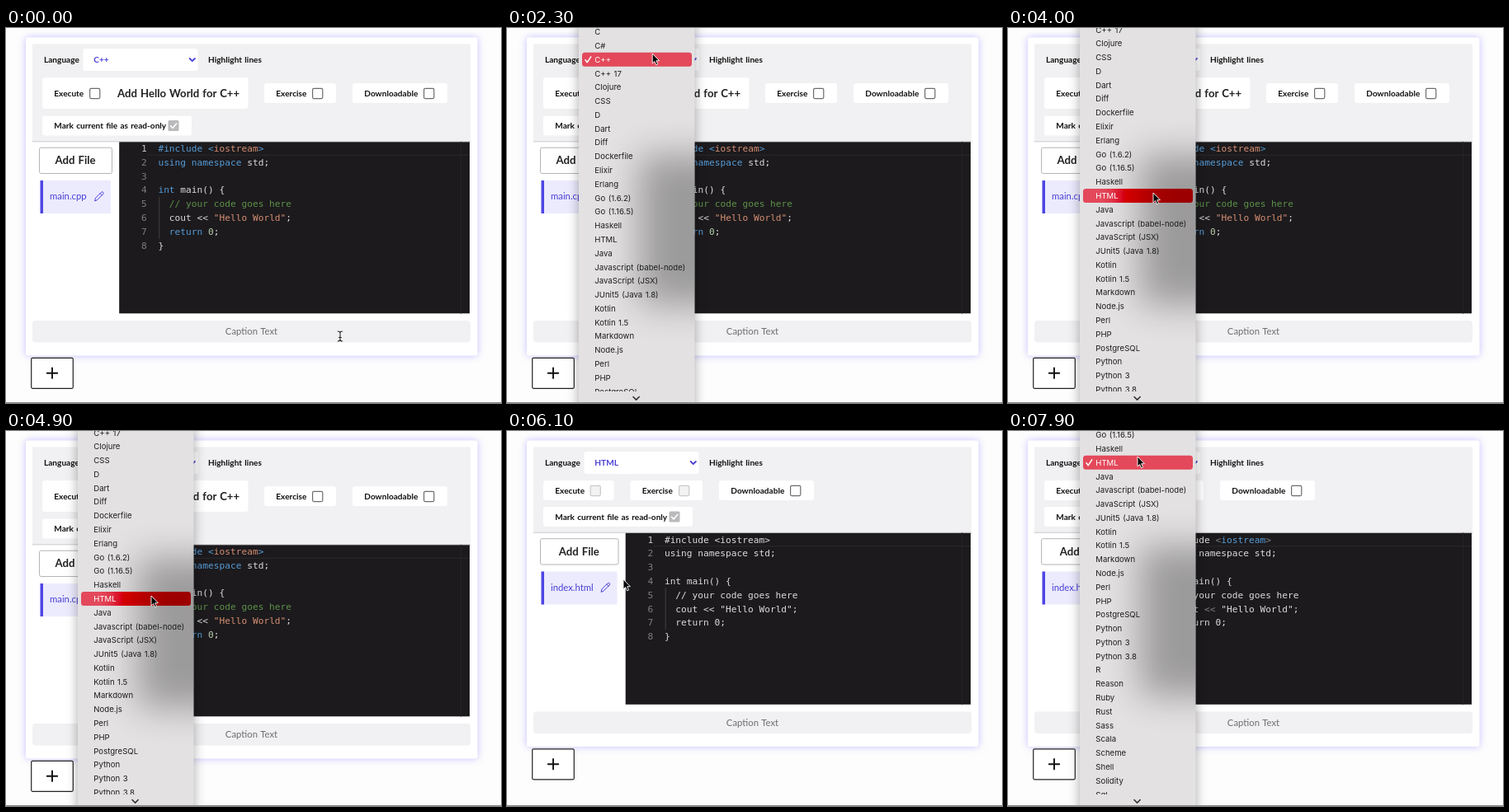
Animation, 600 px wide and 455 px high, one loop 8000 ms. Source, as an HTML page:

```html
<!DOCTYPE html>
<html lang="en">
<head>
<meta charset="utf-8">
<title>Choosing a language</title>
<style>
  html, body { margin: 0; width: 100%; height: 100%; overflow: hidden; background: #fdfdfd; }
  svg { display: block; }
  text { white-space: pre; }
  .ui { font: 400 11.3px Lato, sans-serif; word-spacing: .8px; }
  .label { font: 700 10.1px Lato, sans-serif; fill: #111; }
  .title { font: 700 13.2px Lato, sans-serif; fill: #222; }
  .accent { fill: #4a3fd6; }
  .code { font: 11.2px "DejaVu Sans Mono", monospace; word-spacing: 0; fill: #dcdcdc; }
  .num { fill: #7d7d7f; text-anchor: end; }
  .cpp .k, .cpp .a, .html .h { fill: #569cd6; }
  .cpp .h, .cpp .s { fill: #d58f72; }
  .cpp .c { fill: #5d9149; }
  .cpp .n { fill: #b5cea8; }
  .html .a, .html .o { fill: #808080; }
  .card { filter: drop-shadow(0 0 5px #a9a4ffb0); }
  #panel { filter: drop-shadow(0 3px 7px #0005); }
  #shade { filter: blur(22px); }
  #bar { mix-blend-mode: color-burn; }
  .item { font: 9.6px Inter, sans-serif; fill: #1e1e1e; }
  .item.on { fill: #fff; }
  .line { fill: none; stroke-linecap: round; stroke-linejoin: round; }
</style>
</head>
<body>
<svg id="stage" width="600" height="455" viewBox="0 0 600 455"></svg>
<script>
const rect = (x, y, w, h, fill, more = '') =>
  `<rect x="${x}" y="${y}" width="${w}" height="${h}" fill="${fill}" ${more}/>`;
const text = (x, y, s, cls, more = '') =>
  `<text x="${x}" y="${y}" class="${cls}" xml:space="preserve" ${more}>${s}</text>`;
const line = (d, color, w) =>
  `<path class="line" d="${d}" stroke="${color}" stroke-width="${w}"/>`;

// Each token is [class, text]
const source = [
  [['k', '#include '], ['a', '&lt;'], ['h', 'iostream'], ['a', '&gt;']],
  [['k', 'using namespace'], ['', ' std;']],
  [],
  [['k', 'int'], ['', ' main() {']],
  [['c', '  // your code goes here']],
  [['', '  cout '], ['o', '&lt;&lt;'], ['', ' '], ['s', '"Hello World"'], ['', ';']],
  [['k', '  return '], ['n', '0'], ['', ';']],
  [['', '}']]
];

const items = ['C', 'C#', 'C++', 'C++ 17', 'Clojure', 'CSS', 'D', 'Dart', 'Diff', 'Dockerfile',
  'Elixir', 'Erlang', 'Go (1.6.2)', 'Go (1.16.5)', 'Haskell', 'HTML', 'Java',
  'Javascript (babel-node)', 'JavaScript (JSX)', 'JUnit5 (Java 1.8)', 'Kotlin', 'Kotlin 1.5',
  'Markdown', 'Node.js', 'Perl', 'PHP', 'PostgreSQL', 'Python', 'Python 3', 'Python 3.8', 'R',
  'Reason', 'Ruby', 'Rust', 'Sass', 'Scala', 'Scheme', 'Shell', 'Solidity', 'Sql'];
const ROW = 16.78, FIRST = 38.3 - 2 * ROW;
const CPP = items.indexOf('C++'), HTML = items.indexOf('HTML');

function checkbox(x, y, off) {
  return rect(x + .6, y + .6, 12.2, 12.2, off ? '#f3f2f3' : '#fff',
    `rx="1.5" stroke="${off ? '#c9c8ca' : '#6c6c6e'}" stroke-width="1.2"`);
}

function option(x, y, w, label, off) {
  return rect(x, y, w, 24, '#fff', 'rx="3"') + text(x + 14.3, y + 15.8, label, 'label') +
    checkbox(x + w - 29, y + 5.8, off);
}

function editor(x, y) {
  let s = rect(x, y, 562 - x, 208, '#1c1a1d') +
    line(`M${x + 34} ${y + 16}H561.5`, '#2b292c', 1) +
    line(`M551.5 ${y}V${y + 208}`, '#252326', 1) +
    line(`M${x + 48.5} ${y + 67}v50`, '#404040', 1);
  source.forEach((tokens, i) => {
    const base = y + 11.7 + i * 16.8;
    s += text(x + 33.5, base, i + 1, 'code num', i ? '' : 'style="fill:#c6c6c6"') +
      text(x + 47.2, base, tokens.map(([c, v]) => `<tspan class="${c}">${v}</tspan>`).join(''), 'code');
  });
  return s;
}

function page(isHtml) {
  const up = isHtml ? 14.5 : 0, wide = isHtml ? 6.5 : 0;
  const top = 138.3 - up, cx = 84 + wide / 2, pen = 113 + wide;
  return rect(24, 11.5, 547.5, 386 - up, '#fff', 'rx="3" class="card"') +
    rect(32, 19.5, 531, top - 19.5, '#f1f0f2') +
    line(`M32 ${top - .5}H563`, '#cfcdd0', 1) +
    text(46, 42, 'Language', 'label') +
    rect(93.5, 25, 139, 27, '#fff', 'rx="3"') +
    text(106.3, 42, isHtml ? 'HTML' : 'C++', 'label', 'style="fill:#4a3fd6"') +
    line('M222.7 37l3.1 3.1 3.1-3.1', '#4a3fd6', 1.8) +
    text(245, 42, 'Highlight lines', 'label') +
    (isHtml
      ? option(44, 60, 85.5, 'Execute', true) + option(149.5, 60, 87.5, 'Exercise', true) +
        option(257, 60, 115, 'Downloadable')
      : rect(44, 60, 249.5, 38, '#fff', 'rx="3"') + option(44, 67, 86, 'Execute') +
        text(135, 84, 'Add Hello World for C++', 'title') +
        option(313, 67, 87, 'Exercise') + option(420, 67, 115, 'Downloadable')) +
    rect(44, 106.5 - up, 181, 24, '#fff', 'rx="3"') +
    text(58.3, 122.3 - up, 'Mark current file as read-only', 'label') +
    rect(196.5, 112 - up, 13, 13, '#bab9bc', 'rx="1.5"') +
    line(`M199.5 ${118.8 - up}l2.5 2.6 4.6-5.4`, '#fff', 1.6) +
    rect(40.5, 145.2 - up, 88 + wide, 31.3, '#fff', 'rx="2" stroke="#b5b4b7"') +
    text(cx, 165.3 - up, 'Add File', 'title', 'text-anchor="middle"') +
    rect(41.5, 185 - up, 85.5 + wide, 40, '#ecebfe') +
    rect(41.5, 185 - up, 3.5, 40, '#4f46e5') +
    text(53, 208.3 - up, isHtml ? 'index.html' : 'main.cpp', 'accent') +
    line(`M${pen - 5.3} ${209.5 - up}l.8-3.2 7.2-7.2q1-.8 2 .2t.2 2l-7.2 7.2zM${pen + 1.2} ${200.6 - up}l2.2 2.2`, '#4a3fd6', 1) +
    editor(137.2 + wide, top) +
    rect(32, 355 - up, 531, 26.5, '#f1f0f2', 'rx="4"') +
    text(297.5, 372 - up, 'Caption Text', '', 'text-anchor="middle" fill="#6e6e70"') +
    rect(30.7, 400.3 - up, 50.6, 37, '#fff', 'rx="1.5" stroke="#222" stroke-width="1.2"') +
    line(`M49.8 ${418.7 - up}h12.4m-6.2-6.2v12.4`, '#111', 1.9);
}

const stage = document.getElementById('stage');
stage.innerHTML = `
  <defs><clipPath id="inside">${rect(87, -20, 140.5, 500, '#000')}</clipPath>
  <clipPath id="list">${rect(87, -20, 140.5, 461, '#000')}</clipPath></defs>
  <g id="before" class="ui cpp">${page(false)}</g>
  <g id="after" class="ui">${page(true)}</g>
  <g id="menu">
    ${rect(87, -20, 140.5, 500, '#e3e1e2', 'id="panel"')}
    <g clip-path="url(#inside)">${rect(160, 154, 150, 182, '#000', 'id="shade"')}</g>
    ${rect(91, 0, 133, 17, '#ff2a2d', 'id="bar" rx="3.5"')}
    <g clip-path="url(#list)"><g id="rows" class="ui">
      ${items.map((s, i) => text(106.3, FIRST + i * ROW + 3.5, s, 'item')).join('')}
      <path id="tick" class="line" d="M-3.2 .4l2.3 3 4.4-6.8" stroke-width="1.5"/>
    </g></g>
    ${line('M153 447.5l3.6 3.6 3.6-3.6', '#333', 1.6)}
  </g>
  ${rect(0, 454, 600, 1, '#858585')}
  <g id="arrow"><path d="M0 0V12l2.7-2.5 1.9 4.3 2-.9-1.9-4.2h3.7z" fill="#000" stroke="#fff" stroke-width=".9"/></g>
  <g id="beam">${['#fff', '#222'].map((c, i) =>
    line('M-2.8-6Q0-6 0-4V4Q0 6-2.8 6M2.8-6Q0-6 0-4M0 4Q0 6 2.8 6M-1.5 1.5h3', c, 2.4 - i * 1.3)).join('')}</g>`;

const [before, after, menu, panel, shade, bar, rows, tick, arrow, beam] =
  ['before', 'after', 'menu', 'panel', 'shade', 'bar', 'rows', 'tick', 'arrow', 'beam']
    .map(id => document.getElementById(id));
const labels = [...rows.querySelectorAll('text')];

const clamp = v => Math.min(1, Math.max(0, v));
const ease = (t, a, b) => { const p = clamp((t - a) / (b - a)); return p * p * (3 - 2 * p); };
const show = (node, on) => node.style.display = on ? '' : 'none';
const move = (node, x, y) => node.setAttribute('transform', `translate(${x} ${y})`);
const fade = (node, v) => node.setAttribute('opacity', v);

// Pointer stops: [ms, x, y]
const path = [[50, 405, 374], [950, 180, 31], [1900, 180, 31], [2490, 175, 31], [3300, 176, 200],
  [5300, 176, 200], [5600, 154, 209], [5750, 154, 209], [6100, 141, 180], [6650, 141, 180],
  [7400, 157, 31], [8000, 157, 31]];

function pointer(t) {
  const i = Math.max(1, path.findIndex(p => p[0] > t));
  const [a, x, y] = path[i - 1], [b, x2, y2] = path[i], p = ease(t, a, b);
  return [x + (x2 - x) * p, y + (y2 - y) * p];
}

function drawMenu(t, isHtml) {
  const chosen = isHtml ? HTML : CPP;
  const scroll = isHtml ? (HTML - CPP) * ROW : 53 * ease(t, 3150, 3600);
  const hover = Math.round((pointer(t - 100)[1] - FIRST + scroll) / ROW);
  // On closing, the backdrop thins out before the labels do
  const solid = isHtml ? 1 : 1 - clamp((t - 5675) / 225);
  fade(panel, solid);
  fade(shade, .31 * solid ** 3);
  fade(menu, isHtml ? 1 : 1 - clamp((t - 5720) / 180));
  move(rows, 0, -scroll);
  move(shade, 0, isHtml ? -14.5 : 0);
  bar.setAttribute('y', FIRST + hover * ROW - scroll - 8.5);
  labels.forEach((n, i) => n.classList.toggle('on', i === hover));
  move(tick, 98.2, FIRST + chosen * ROW);
  tick.setAttribute('stroke', hover === chosen ? '#fff' : '#1e1e1e');
}

function draw(t) {
  const isHtml = t >= 5900;
  show(before, !isHtml);
  show(after, isHtml);
  after.setAttribute('class', t > 6500 ? 'ui html' : 'ui');

  const open = t >= 2000 && t < 5900 || t >= 7500;
  show(menu, open);
  if (open) drawMenu(t, isHtml);

  const [x, y] = pointer(t), typing = t < 1000 && y > 139;
  show(beam, typing);
  show(arrow, !typing);
  move(typing ? beam : arrow, x, y);
}

function loop() {
  draw(performance.now() % 8000);
  requestAnimationFrame(loop);
}
loop();
</script>
</body>
</html>
```
